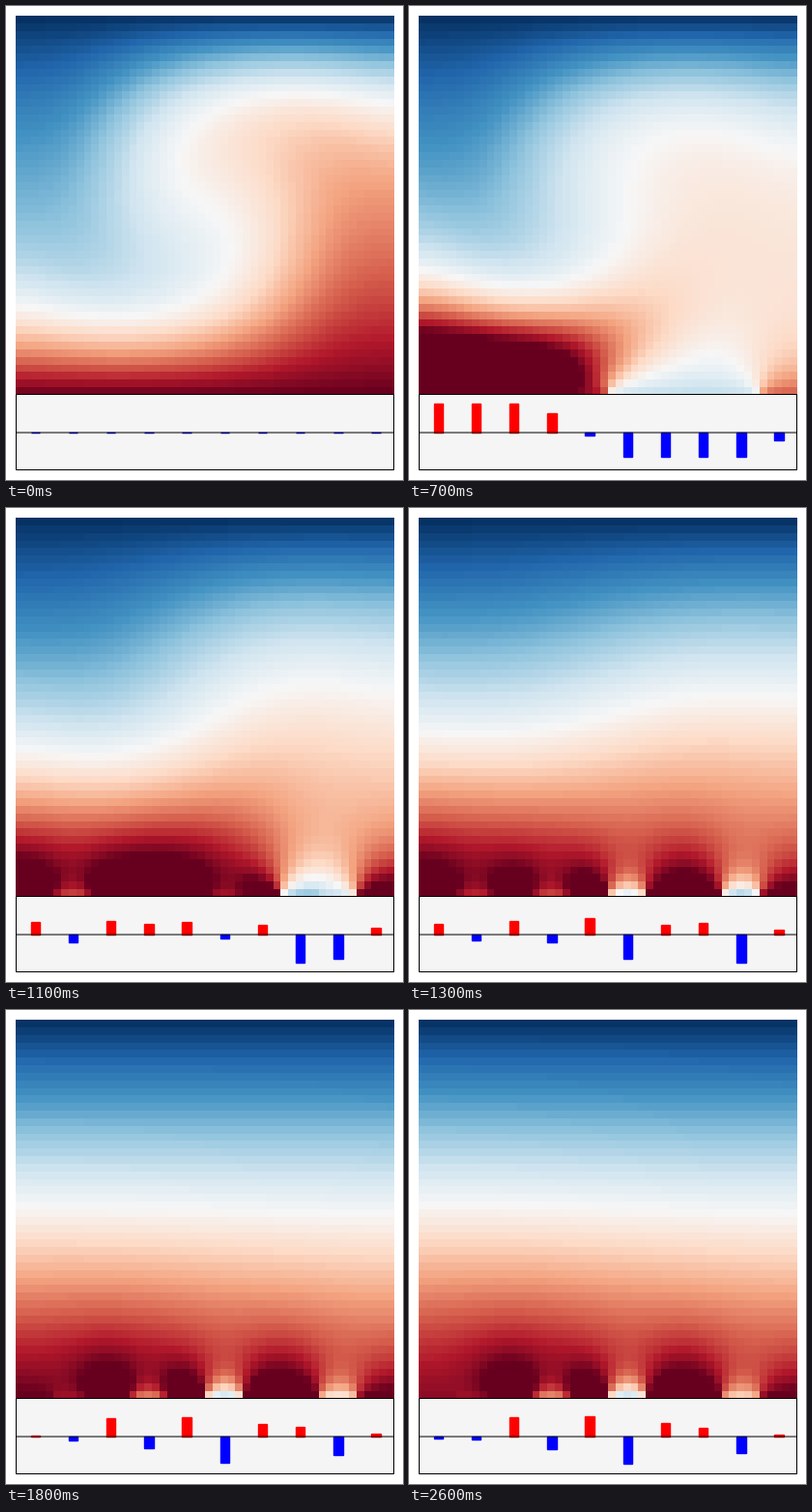
Recreate the animation shown at these times as a matplotlib script. Size 411x490 px, loop 8000 ms.

```python
import numpy as np
import matplotlib.pyplot as plt
from matplotlib.animation import FuncAnimation
from matplotlib.patches import Rectangle

W, H, DPI = 411, 490, 100
N, SEGS = 50, 10
STEP_MS, FRAMES = 100, 80
START, SETTLE, END = 400, 1300, 2600   # ms: control on, fine tuning, at rest
MID, HALF = 441, 39.2                  # zero line and pixels per unit of heating
PX = 72 / DPI                          # one pixel in points

DT = 0.18 / N**2                       # time in units of heat diffusion
STEP = 0.035                           # diffusion time per frame
SPIN = 7                               # strength of the convection roll
SPIN_FADE, TUNE_FADE = 540, 310        # ms

# Heater bars in pixels: push against the roll, then balance it
seg = np.arange(SEGS)
KEY_T = [500, 900, 1100, SETTLE]
KEYS = np.array([
    np.interp(seg, [2, 3, 4, 5], [30, 15, 7, -22]),
    np.interp(seg, [2, 3, 4, 5, 8, 9], [30, 25, -12, -27, -27, 7]),
    [13, -8, 14, 11, 13, -4, 10, -29, -25, 7],
    [11, -6, 14, -8, 17, -25, 10, 12, -29, 5],
])
FINAL = np.array([-2, -3, 20, -13, 21, -28, 14, 9, -17, 2])


def heat(t):
    if t <= START:
        return np.zeros(SEGS)
    push = np.array([np.interp(t, KEY_T, col) for col in KEYS.T])
    return FINAL + (push - FINAL) * np.exp(-max(t - SETTLE, 0) / TUNE_FADE)


def spin(t):
    return SPIN * np.exp(-(max(t - START, 0) / SPIN_FADE) ** 2)


# One roll filling the box: down on the left, up on the right
c = np.pi * (np.arange(N) + 0.5) / N
U = -np.pi * np.outer(np.sin(2 * c), np.sin(c) ** 2)
V = np.pi * np.outer(np.sin(c) ** 2, np.sin(2 * c))


def diffuse(temp, bars, flow, span):
    """Carry and conduct heat: cold top, heated bottom, insulated sides."""
    floor = 1 + np.repeat(bars, N // SEGS) / HALF
    pad = np.empty((N + 2, N + 2))
    mid = pad[1:-1, 1:-1]
    mid[:] = temp
    up, down = pad[:-2, 1:-1], pad[2:, 1:-1]
    left, right = pad[1:-1, :-2], pad[1:-1, 2:]
    k = DT * N**2
    cx, cy = flow * U * DT * N / 2, flow * V * DT * N / 2
    for _ in range(round(span / DT)):
        pad[0, 1:-1] = -pad[1, 1:-1]
        pad[-1, 1:-1] = 2 * floor - pad[-2, 1:-1]
        pad[:, 0], pad[:, -1] = pad[:, 1], pad[:, -2]
        mid[:] = ((1 - 4 * k) * mid + (k + cx) * left + (k - cx) * right
                  + (k + cy) * up + (k - cy) * down)
    return mid.copy()


def simulate():
    rest = np.repeat(c[:, None] / np.pi, N, axis=1)
    temp = diffuse(rest, heat(0), SPIN, 0.8)
    fields = []
    for t in range(0, END + 1, STEP_MS):
        if t > START:
            temp = diffuse(temp, heat(t), spin(t - STEP_MS / 2), STEP)
        fields.append(temp)
    return fields


fields = simulate()

fig = plt.figure(figsize=(W / DPI, H / DPI), dpi=DPI, facecolor="white")
ax = fig.add_axes([0, 0, 1, 1])
image = ax.imshow(fields[0], cmap="RdBu_r", vmin=0, vmax=1, aspect="auto",
                  interpolation="nearest", extent=(10.01, 401.99, 401.99, 10.01))
ax.set_xlim(0, W)
ax.set_ylim(H, 0)
ax.axis("off")

ax.add_patch(Rectangle((10, 401), 391, 78, fc="#f5f5f5", ec="none", zorder=2))
bars = [ax.add_patch(Rectangle((25.65 + HALF * i, MID), 9.4, 0, lw=1, zorder=3))
        for i in seg]
ax.plot([11, 401], [MID, MID], color="black", alpha=0.5, lw=1.5,
        solid_capstyle="butt", zorder=4)
ax.add_patch(Rectangle((10, 401), 391, 78, fill=False, ec="black", lw=PX, zorder=5))


def update(n):
    i = min(n, len(fields) - 1)
    image.set_data(fields[i])
    for bar, h in zip(bars, heat(i * STEP_MS)):
        bar.set_height(-h)
        bar.set_color("red" if h > 0 else "blue")
    return [image, *bars]


anim = FuncAnimation(fig, update, frames=FRAMES, interval=STEP_MS,
                     repeat=True, repeat_delay=0, blit=False)
plt.show()
```
